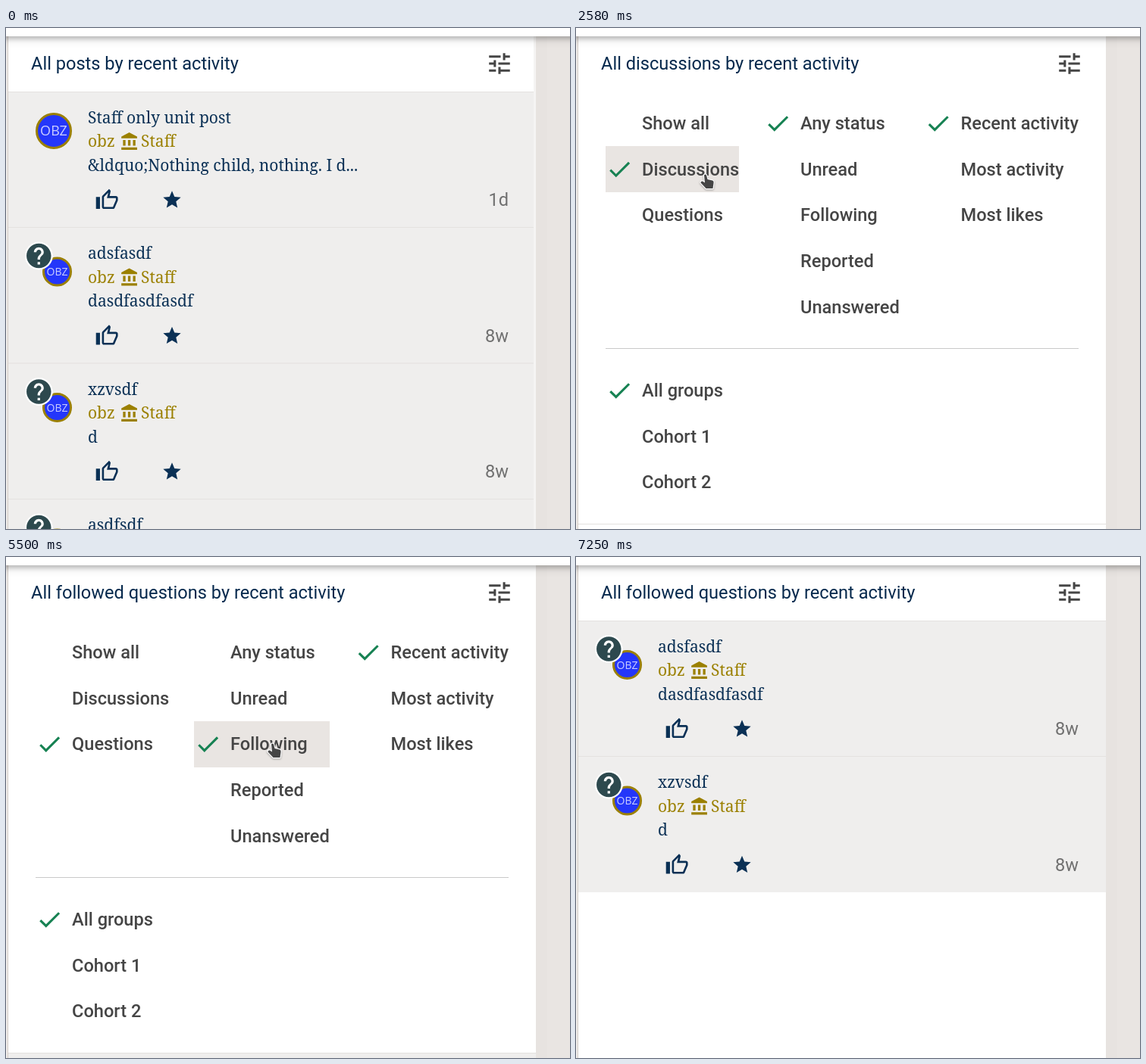
An HTML page that plays this animation: 744 by 662 pixels, repeating every 7.58 s.

```html
<!DOCTYPE html>
<html lang="en">
<head>
<meta charset="utf-8">
<title>Post filters</title>
<style>
  html, body { margin: 0; width: 100%; height: 100%; overflow: hidden; background: #e9e5e2; }
  svg { display: block; }
  text { font: 400 23.6px Roboto, sans-serif; }
  .head { fill: #06294d; }
  .menu text { font-weight: 500; fill: #454545; }
  .check { fill: #178253; }
  .post text { font: 400 21px "Noto Serif", serif; fill: #0a3055; }
  .post .title { font-weight: 500; }
  .post .staff { fill: #9b8000; }
  .post .age { font: 400 23.6px Roboto, sans-serif; fill: #707070; }
  .post .tag { font-family: "Open Sans", sans-serif; fill: #c9ccff; text-anchor: middle; }
  .bar { fill: #fff; filter: drop-shadow(0 3px 3px rgba(0,0,0,.2)) drop-shadow(0 3px 6px rgba(0,0,0,.15)); }
  #cursor { fill: #454545; stroke: #fff; stroke-width: 2.4; stroke-linejoin: round; paint-order: stroke;
    filter: drop-shadow(0 1px 1px rgba(0,0,0,.3)); }
</style>
</head>
<body>
<svg width="744" height="662" viewBox="0 0 744 662">
  <defs>
    <symbol id="check" viewBox="0 0 24 24"><path d="M9 16.17 4.83 12l-1.42 1.41L9 19 21 7l-1.41-1.41z"/></symbol>
    <symbol id="tune" viewBox="0 0 24 24"><path d="M3 17v2h6v-2H3zM3 5v2h10V5H3zm10 16v-2h8v-2h-8v-2h-2v6h2zM7 9v2H3v2h4v2h2V9H7zm14 4v-2H11v2h10zm-6-4h2V7h4V5h-4V3h-2v6z"/></symbol>
    <symbol id="thumb" viewBox="0 0 24 24"><path d="M9 21h9c.83 0 1.54-.5 1.84-1.22l3.02-7.05c.09-.23.14-.47.14-.73v-2c0-1.1-.9-2-2-2h-6.31l.95-4.57.03-.32c0-.41-.17-.79-.44-1.06L14.17 1 7.58 7.59C7.22 7.95 7 8.45 7 9v10c0 1.1.9 2 2 2zM9 9l4.34-4.34L12 10h9v2l-3 7H9V9zM1 9h4v12H1z"/></symbol>
    <symbol id="star" viewBox="0 0 24 24"><path d="M12 17.27 18.18 21l-1.64-7.03L22 9.24l-7.19-.61L12 2 9.19 8.63 2 9.24l5.46 4.73L5.82 21z"/></symbol>
    <symbol id="bank" viewBox="0 0 24 24"><path d="M4 10v7h3v-7H4zm6 0v7h3v-7h-3zM2 22h19v-3H2v3zm14-12v7h3v-7h-3zM11.5 1 2 6v2h19V6z"/></symbol>
    <symbol id="help" viewBox="0 0 24 24"><path d="M12 2C6.48 2 2 6.48 2 12s4.48 10 10 10 10-4.48 10-10S17.52 2 12 2zm1 17h-2v-2h2v2zm2.07-7.75l-.9.92C13.45 12.9 13 13.5 13 15h-2v-.5c0-1.1.45-2.1 1.17-2.83l1.24-1.26c.37-.36.59-.86.59-1.41 0-1.1-.9-2-2-2s-2 .9-2 2H8c0-2.21 1.79-4 4-4s4 1.79 4 4c0 .88-.36 1.68-.93 2.25z"/></symbol>
    <clipPath id="side"><path d="M3 0H699V662H3z"/></clipPath>
  </defs>
  <path d="M0 0H3V662H0z" fill="#efecea"/>
  <path d="M2 0H3V662H2z" fill="#d3ccc7"/>
  <path d="M699 0H714V662H699z" fill="#e7e3e0"/>
  <path d="M3 0H699V662H3z" fill="#fff"/>
  <g clip-path="url(#side)">
    <g id="menu" class="menu"></g>
    <g id="list">
      <path id="empty" d="M3 0H699V662H3z" fill="#fff"/>
      <g id="posts"></g>
      <path d="M3 0H699V1H3z" fill="#e4e2e0"/>
    </g>
    <text id="head" class="head" x="33" y="55"></text>
    <use href="#tune" x="632.6" y="28.6" width="36.75" height="36.75" fill="#454545"/>
    <rect id="scroll" y="11" height="651"/>
  </g>
  <rect class="bar" x="-20" y="-20" width="784" height="31"/>
  <path id="cursor"/>
</svg>
<script>
const $ = id => document.getElementById(id);
const FPS = 12, LOOP = 7580, HEAD = 84, MENU = 571, ROW = 60.6, POST = 179.5;

const columns = [
  { x: 39, w: 176, y: 126, rows: ['Show all', 'Discussions', 'Questions'] },
  { x: 248, w: 179, y: 126, rows: ['Any status', 'Unread', 'Following', 'Reported', 'Unanswered'] },
  { x: 459.5, w: 204, y: 126, rows: ['Recent activity', 'Most activity', 'Most likes'] },
  { x: 39, w: 176, y: 479, rows: ['All groups', 'Cohort 1', 'Cohort 2'] }
];
const posts = [
  ['Staff only unit post', '&amp;ldquo;Nothing child, nothing. I d...', '1d'],
  ['adsfasdf', 'dasdfasdfasdf', '8w', true],
  ['xzvsdf', 'd', '8w', true],
  ['asdfsdf', 'asdf', '8w', true]
];

const icon = (name, x, y, size, attrs = '') =>
  `<use href="#${name}" x="${x}" y="${y}" width="${size}" height="${size}" ${attrs}/>`;

function avatar(x, y, r, font) {
  return `<circle cx="${x}" cy="${y}" r="${r - 1.5}" fill="#2436fa" stroke="#9b8000" stroke-width="3"/>
    <text class="tag" x="${x}" y="${y + font * .36}" style="font-size:${font}px">OBZ</text>`;
}

function postMarkup([title, body, age, question], i) {
  const face = question
    ? avatar(67.5, 238.5 - 180, 19.5, 14) +
      `<circle cx="43.3" cy="37.5" r="18.5" fill="#fff"/>` + icon('help', 23.8, 18, 39, 'fill="#2d494e"')
    : avatar(63, 52, 24, 18);
  return `<g class="post" transform="translate(0 ${i * POST})">
    <path d="M3 0H699V${POST}H3z" fill="#efeeed"/>
    ${i ? '<path d="M3 -.5H699V.5H3z" fill="#e4e2e0"/>' : ''}
    ${face}
    <text class="title" x="108" y="41.5">${title}</text>
    <text class="staff" x="108" y="73.3">obz</text>
    ${icon('bank', 150, 53, 26.25, 'fill="#9b8000"')}
    <text class="staff" x="178" y="73.3">Staff</text>
    <text x="108" y="104.8">${body}</text>
    <g fill="#0a3055">${icon('thumb', 117.4, 127.5, 31.5)}${icon('star', 205, 129, 28)}</g>
    <text class="age" x="663" y="151" text-anchor="end">${age}</text>
  </g>`;
}

function menuMarkup(picks, lit) {
  let out = '';
  columns.forEach(({ x, w, y, rows }, c) => rows.forEach((label, r) => {
    const cy = y + r * ROW;
    if (lit && lit[0] === c && lit[1] === r)
      out += `<rect x="${x}" y="${Math.round(cy - 30.4)}" width="${w}" height="61" fill="#e9e5e2"/>`;
    if (picks[c] === r) out += icon('check', x, cy - 18.4, 36.75, 'class="check"');
    out += `<text x="${x + 48}" y="${cy + 8.2}">${label}</text>`;
  }));
  return out + '<path d="M39 423H663V424H39z" fill="#c9c9c9"/>';
}

// Cursor keys: tick, x, y
const path = [
  [5, 676, 17], [7, 676, 17], [9, 639, 45], [21, 639, 45], [24, 310, 147], [26, 310, 147],
  [27, 163, 192], [43, 163, 192], [46, 150, 245], [51, 150, 245], [53, 357, 196], [62, 357, 196],
  [64, 344, 245], [67, 344, 245], [75, 660, 36], [76, 652, 31], [82, 652, 31], [87, -10, -20]
];
const HAND = 'M6 2.5Q7.5 .5 9 2.5L10.5 8 17 9.5Q19 10 18.5 13L17.5 20H8.5L1.5 12.5Q1.5 10 4 10.5L7 12.5z';
const ARROW = 'M2 1V17L6 13.5 9 20 12 18.7 9 12.5H14.5z';
const within = (n, a, b) => n >= a && n < b;

function moveCursor(n) {
  const i = path.findIndex(k => k[0] > n);
  $('cursor').style.display = i < 1 ? 'none' : '';
  if (i < 1) return;
  const [a, x, y] = path[i - 1], [b, u, v] = path[i], p = (n - a) / (b - a);
  $('cursor').setAttribute('transform', `translate(${x + (u - x) * p} ${y + (v - y) * p})`);
  const plain = n < 9 || within(n, 22, 27) || within(n, 68, 75) || n >= 83;
  $('cursor').setAttribute('d', plain ? ARROW : HAND);
}

const ramp = d => d < 0 ? 0 : [.468, .86, .982][d] ?? 1;

function highlight(n) {
  if (within(n, 31, 42)) return [0, 1];
  if (within(n, 46, 53)) return [0, 2];
  if (within(n, 53, 63)) return [1, 1];
  if (within(n, 64, 74)) return [1, 2];
}

function draw(n) {
  const open = ramp(n - 14) - ramp(n - 78);
  const type = n < 31 ? 0 : n < 46 ? 1 : 2;
  const status = n < 53 ? 0 : n < 64 ? 1 : 2;
  $('menu').innerHTML = menuMarkup([type, status, 0, 0], highlight(n));
  $('menu').style.opacity = open;
  $('list').setAttribute('transform', `translate(0 ${HEAD + MENU * open})`);
  $('head').textContent = `All ${['', 'unread ', 'followed '][status]}${['posts', 'discussions', 'questions'][type]} by recent activity`;

  const all = n < 31 || within(n, 35, 46) || within(n, 49, 53);
  const shown = all ? posts : n >= 66 ? posts.slice(1, 3) : [];
  $('posts').innerHTML = shown.map(postMarkup).join('');

  const dark = within(n, 12, 31) || within(n, 35, 46);
  const bar = $('scroll');
  bar.setAttribute('x', n < 5 ? 696 : 695);
  bar.setAttribute('width', 3);
  bar.setAttribute('fill', n < 5 ? '#f5f4f3' : n < 12 ? '#b3b1af' : dark ? '#757575' : 'none');
  moveCursor(n);
}

const start = performance.now();
let last = -1;
function tick() {
  const t = (performance.now() - start) % LOOP;
  const n = Math.floor((t + 5) * FPS / 1000);
  if (n !== last) draw(last = n);
  requestAnimationFrame(tick);
}
tick();
</script>
</body>
</html>
```
